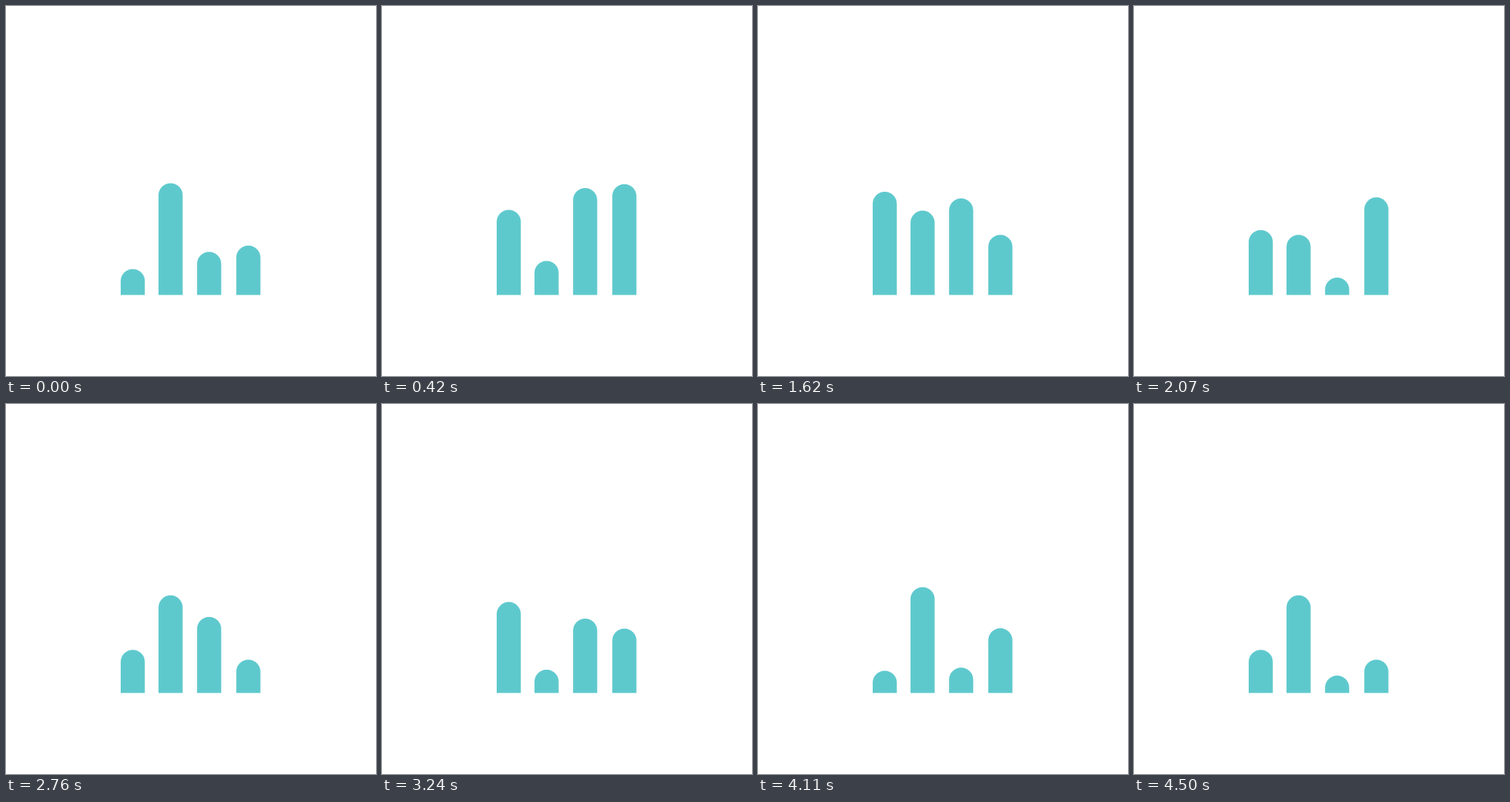
An HTML page that plays this animation: 500x500 px, repeating every 4530 ms.

```html
<!DOCTYPE html>
<html lang="en">
<head>
<meta charset="utf-8">
<title>Equalizer</title>
<style>
  html, body { margin: 0; width: 100%; height: 100%; overflow: hidden; background: #fff; }
  svg { display: block; width: 100%; height: 100%; }
</style>
</head>
<body>
<svg viewBox="0 0 500 500"><g id="bars" fill="#5ec9cd"></g></svg>
<script>
const STEP = 30, COUNT = 151;
const LOW = 367, HIGH = 239.5, BASE = 390.6, WIDTH = 32.6;
const SPEED = 0.18; // usual swings per step

// Key poses: heights from 0 (LOW) to 1 (HIGH); a negative start is falling.
const rest = third => [0.272, 0.85, third, 0.169];
const poses = [
  { at: 0,   heights: [-1 / 11, 1, 0.272, 0.339] },
  { at: 29,  heights: rest(0.181) },
  { at: 54,  heights: [10 / 11, 0.709, 0.839, 0.453] },
  { at: 69,  heights: [0.504, 0.453, 0, 0.85] },
  { at: 92,  heights: rest(0.622) },
  { at: 124, heights: [0.169, 0.724, 0.169, 0.835] },
  { at: 150, heights: rest(0) }
];

// Triangle wave: rises over 0..1, falls over 1..2.
const swing = p => 1 - Math.abs(((p % 2) + 2) % 2 - 1);

// The phase nearest to aim at which a bar has height h.
function nearest(aim, h) {
  const fit = v => v + 2 * Math.round((aim - v) / 2);
  const up = fit(h), down = fit(-h);
  return Math.abs(up - aim) < Math.abs(down - aim) ? up : down;
}

// Bars keep swinging at about SPEED and pass through each pose on time.
poses.forEach((pose, i) => {
  const last = poses[i - 1];
  pose.phases = last
    ? pose.heights.map((h, b) => nearest(last.phases[b] + SPEED * (pose.at - last.at), h))
    : pose.heights;
});

const group = document.getElementById('bars');
const bars = [155, 206.1, 258.2, 311.2].map(x => {
  const path = document.createElementNS('http://www.w3.org/2000/svg', 'path');
  group.appendChild(path);
  return { x, path };
});

function outline(x, top) {
  const r = WIDTH / 2;
  return `M${x} ${BASE}V${top + r}a${r} ${r} 0 0 1 ${WIDTH} 0V${BASE}Z`;
}

function render(ms) {
  const n = Math.floor(ms / STEP) % COUNT;
  const i = Math.max(1, poses.findIndex(pose => pose.at >= n));
  const from = poses[i - 1], to = poses[i];
  const k = (n - from.at) / (to.at - from.at);
  bars.forEach(({ x, path }, b) => {
    const phase = from.phases[b] + (to.phases[b] - from.phases[b]) * k;
    path.setAttribute('d', outline(x, LOW + (HIGH - LOW) * swing(phase)));
  });
}

let start;
function tick(now) {
  if (start === undefined) start = now;
  render(Math.max(0, now - start));
  requestAnimationFrame(tick);
}
render(0);
requestAnimationFrame(tick);
</script>
</body>
</html>
```
